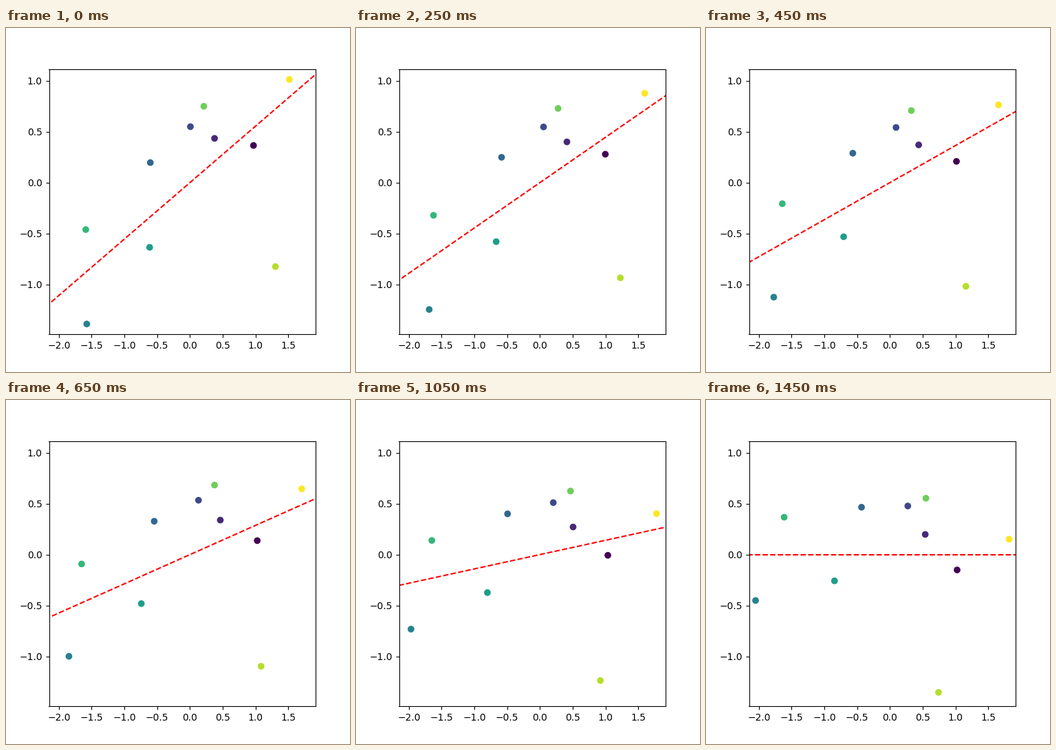
Animation, 500 px wide and 500 px high, one loop 1.5 s. Source, as a matplotlib script:

```python
import numpy as np
import matplotlib.pyplot as plt
from matplotlib.animation import FuncAnimation

FRAMES = 30
INTERVAL = 50
TILT = np.radians(29)
MARGIN = 0.1
REACH = 1.2  # half length of the axis line, relative to the farthest point

# The cloud in its principal axes, as complex numbers; it starts tilted.
cloud = np.array([
    1.024 - .151j, .538 + .198j, .272 + .477j, -.434 + .465j, -2.05 - .451j,
    -.846 - .258j, -1.614 + .367j, .548 + .553j, .740 - 1.353j, 1.816 + .151j,
])
axis = REACH * np.abs(cloud).max() * np.array([-1, 1])


def xy(z):
    return np.column_stack([z.real, z.imag])


def turn(frame):
    return np.exp(1j * TILT * (1 - frame / (FRAMES - 1)))


track = np.concatenate([xy(cloud * turn(i)) for i in range(FRAMES)])
low, high = track.min(axis=0) - MARGIN, track.max(axis=0) + MARGIN

fig, ax = plt.subplots(figsize=(5, 5), dpi=100)
ax.set(xlim=(low[0], high[0]), ylim=(low[1], high[1]))
dots = ax.scatter(cloud.real, cloud.imag, c=np.arange(cloud.size))
line, = ax.plot(axis, 0 * axis, "r--", scalex=False, scaley=False)


def update(frame):
    dots.set_offsets(xy(cloud * turn(frame)))
    line.set_data(*xy(axis * turn(frame)).T)
    return dots, line


anim = FuncAnimation(fig, update, frames=FRAMES, interval=INTERVAL,
                     repeat=True, repeat_delay=0)
plt.show()
```
